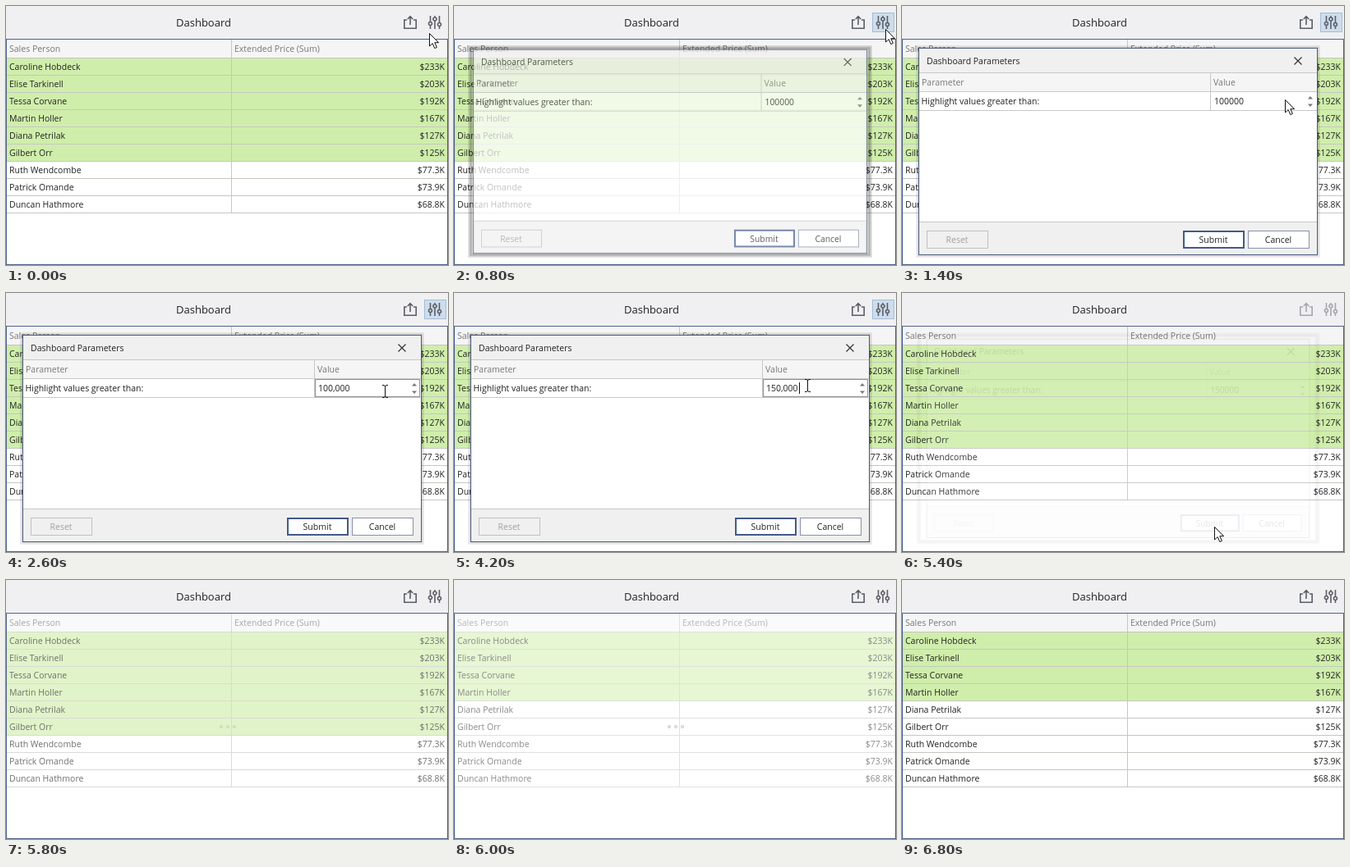
Animation of 538 by 316 pixels, one loop 7000 ms. Source, as an HTML page:

```html
<!DOCTYPE html>
<html lang="en">
<head>
<meta charset="utf-8">
<title>Dashboard</title>
<style>
html, body { margin: 0; width: 100%; height: 100%; overflow: hidden; background: #fff; }
svg { display: block; font: 10.5px "Open Sans", "Noto Sans", sans-serif; }
text { white-space: pre; }
</style>
</head>
<body>
<svg id="stage" width="538" height="316" viewBox="0 0 538 316"></svg>
<script>
const stage = document.getElementById('stage');
const LOOP = 7000, STEP = 200;

const people = [
  ['Caroline Hobdeck', '$233K'], ['Elise Tarkinell', '$203K'], ['Tessa Corvane', '$192K'],
  ['Martin Holler', '$167K'], ['Diana Petrilak', '$127K'], ['Gilbert Orr', '$125K'],
  ['Ruth Wendcombe', '$77.3K'], ['Patrick Omande', '$73.9K'], ['Duncan Hathmore', '$68.8K']
];

// Timelines: [start ms, ...state]
const pointer = [
  [0, 'arrow', 515, 33], [200, 'arrow', 525, 28], [1000, 'arrow', 517, 52],
  [1200, 'arrow', 490, 92], [1400, 'arrow', 466, 114], [1600, 'arrow', 460, 118],
  [1800, 'beam', 461, 120], [3000, 'beam', 446, 117], [3200, 'beam', 430, 113],
  [4400, 'arrow', 412, 190], [4600, 'arrow', 381, 284], [5000, 'arrow', 380, 285],
  [5800, 'none', 0, 0]
];
const fade = [ // opacity, scale
  [0, 0, 1], [600, .3, .965], [800, .72, .987], [1000, 1, 1],
  [5000, .75, .987], [5200, .35, .97], [5400, .1, .96], [5600, 0, 1]
];
const typed = [
  [0, '100000'], [2200, '100,000'], [3600, '1'], [3800, '150'],
  [4000, '15,000'], [4200, '150,000'], [4800, '150000']
];
const veil = [[0, 0], [5800, .35], [6000, .47], [6200, .2], [6400, 0]];

const at = (keys, t) => keys.filter(k => k[0] <= t).pop().slice(1);
const within = (t, a, b) => t >= a && t < b;

const rect = (x, y, w, h, fill, more = '') =>
  `<rect x="${x}" y="${y}" width="${w}" height="${h}" fill="${fill}" ${more}/>`;
const frame = (x, y, w, h, color, fill = 'none', width = 1, more = '') =>
  rect(x + width / 2, y + width / 2, w - width, h - width, fill,
    `stroke="${color}" stroke-width="${width}" ${more}`);
const text = (x, y, s, fill = '#222', more = '') =>
  `<text x="${x}" y="${y}" fill="${fill}" ${more}>${s}</text>`;
const path = (d, more) => `<path d="${d}" ${more}/>`;
const END = 'text-anchor="end"', MID = 'text-anchor="middle"';

function toolbar(t) {
  const active = within(t, 200, 5200), dim = within(t, 5400, 5800);
  const knobs = [[516.5, 21.5], [522, 16], [527.5, 22.5]];
  const line = 'fill="none" stroke="#5c5e66" stroke-width="1.6"';
  return rect(0, 0, 538, 40, '#f0f0f2') +
    text(240.5, 24.5, 'Dashboard', '#222', `${MID} font-size="13"`) +
    (active ? frame(509, 8, 27, 24, '#a3bcd6', '#cddded') : '') +
    `<g opacity="${dim ? .5 : 1}">` +
    path('M488 17H484.8V27.2H499.2V17H496M492 23V13M488.8 16L492 12.6L495.2 16', line) +
    knobs.map(([x, y]) => path(`M${x} 12V${y - 2.2}M${x} ${y + 2.2}V28`, line) +
      `<circle cx="${x}" cy="${y}" r="2" ${line}/>`).join('') +
    '</g>';
}

function grid(t) {
  const marked = t < 6000 ? 6 : 4, [white] = at(veil, t);
  let s = rect(0, 40, 538, 276, '#fff') + rect(1, 41, 536, 22, '#f5f5f5') +
    rect(1, 63, 536, 1, '#c4c4c4') +
    text(4, 56, 'Sales Person', '#777') + text(278, 56, 'Extended Price (Sum)', '#777');
  people.forEach(([name, sum], i) => {
    const y = 64 + 21 * i;
    if (i < marked) s += rect(1, y, 536, 20, '#d0eeab');
    s += rect(1, y + 20, 536, 1, '#c4c8c0') + text(4, y + 14, name) + text(534, y + 14, sum, '#222', END);
  });
  s += rect(274, 41, 1, 212, '#c4c8c0').replace('height="212"', 'height="212"');
  if (white) {
    s += rect(1, 41, 536, 274, '#fff', `opacity="${white}"`);
    for (const x of [260, 268, 276]) s += rect(x, 177, 4, 4, '#b8b8b8', `opacity="${white}"`);
  }
  return s + frame(0, 40, 538, 276, '#4f648c');
}

function button(x, label, color, edge, width, fill) {
  return frame(x, 274, 75, 22, edge, fill, width) + text(x + 37, 289, label, color, MID);
}

function editor(t) {
  const [value] = at(typed, t), focus = within(t, 2200, 4800);
  const selected = within(t, 3200, 3600);
  const caret = focus && !selected && !within(t, 2600, 3000);
  const commas = value.split(',').length - 1;
  const width = (value.length - commas) * 6 + commas * 2.6;
  return (focus ? frame(376, 105, 128, 22, '#222', '#fff', 1, 'stroke-dasharray="1 1"') : '') +
    (selected ? rect(380, 109, width, 14, '#3273c8') : '') +
    text(380, 120, value, selected ? '#fff' : '#222') +
    (caret ? rect(Math.round(382 + width - .5), 109, 1, 14, '#111') : '') +
    path('M494 113.5L497 110L500 113.5ZM494 119.5L497 123L500 119.5Z', 'fill="#777"');
}

function dialog(t) {
  const [opacity, scale] = at(fade, t);
  if (!opacity) return '';
  const shade = opacity < 1 ? .16 : .07;
  const shadow = [2, 4, 7].map(w => `<rect x="20.5" y="51.5" width="485" height="252" fill="none"
    stroke="#000" stroke-width="${w}" opacity="${shade * opacity}"/>`).join('');
  return shadow +
    `<g opacity="${opacity}" transform="translate(263 177.5) scale(${scale}) translate(-263 -177.5)">` +
    frame(20, 51, 486, 253, '#4f5f80', '#f0f0f0') +
    text(30, 71, 'Dashboard Parameters') +
    path('M477.5 62.5L486.5 71.5M486.5 62.5L477.5 71.5', 'stroke="#333" stroke-width="1.2"') +
    rect(21, 82, 484, 182, '#fff') + rect(21, 82, 484, 22, '#f5f5f5') +
    [81, 104, 127, 263].map(y => rect(21, y, 484, 1, '#c8c8c8')).join('') +
    rect(375, 82, 1, 45, '#c8c8c8') +
    text(24, 97, 'Parameter', '#777') + text(379, 97, 'Value', '#777') +
    text(23.5, 120, 'Highlight values greater than:') + editor(t) +
    button(30, 'Reset', '#a0a0a0', '#c0c0c0', 1, '#f0f0f0') +
    button(342, 'Submit', '#222', '#43598c', 2, within(t, 4800, 5000) ? '#cddded' : '#fff') +
    button(421, 'Cancel', '#222', '#8791a8', 1, '#fff') +
    '</g>';
}

function cursor(t) {
  const [kind, x, y] = at(pointer, t);
  const shape = {
    arrow: path('M.5 .5V16L4.2 12.6L6.8 18.6L9.4 17.4L6.8 11.7H11.6Z', 'fill="#fff" stroke="#111"'),
    beam: path('M-3 -7.5H-1L.5 -6.5L2 -7.5H4M.5 -7V7M-3 7.5H-1L.5 6.5L2 7.5H4', 'fill="none" stroke="#111"'),
    none: ''
  }[kind];
  return `<g transform="translate(${x} ${y})">${shape}</g>`;
}

let shown = -1;
function tick(now) {
  const t = Math.floor(now % LOOP / STEP) * STEP;
  if (t !== shown) {
    shown = t;
    stage.innerHTML = toolbar(t) + grid(t) + dialog(t) + cursor(t);
  }
  requestAnimationFrame(tick);
}
tick(performance.now());
</script>
</body>
</html>
```
